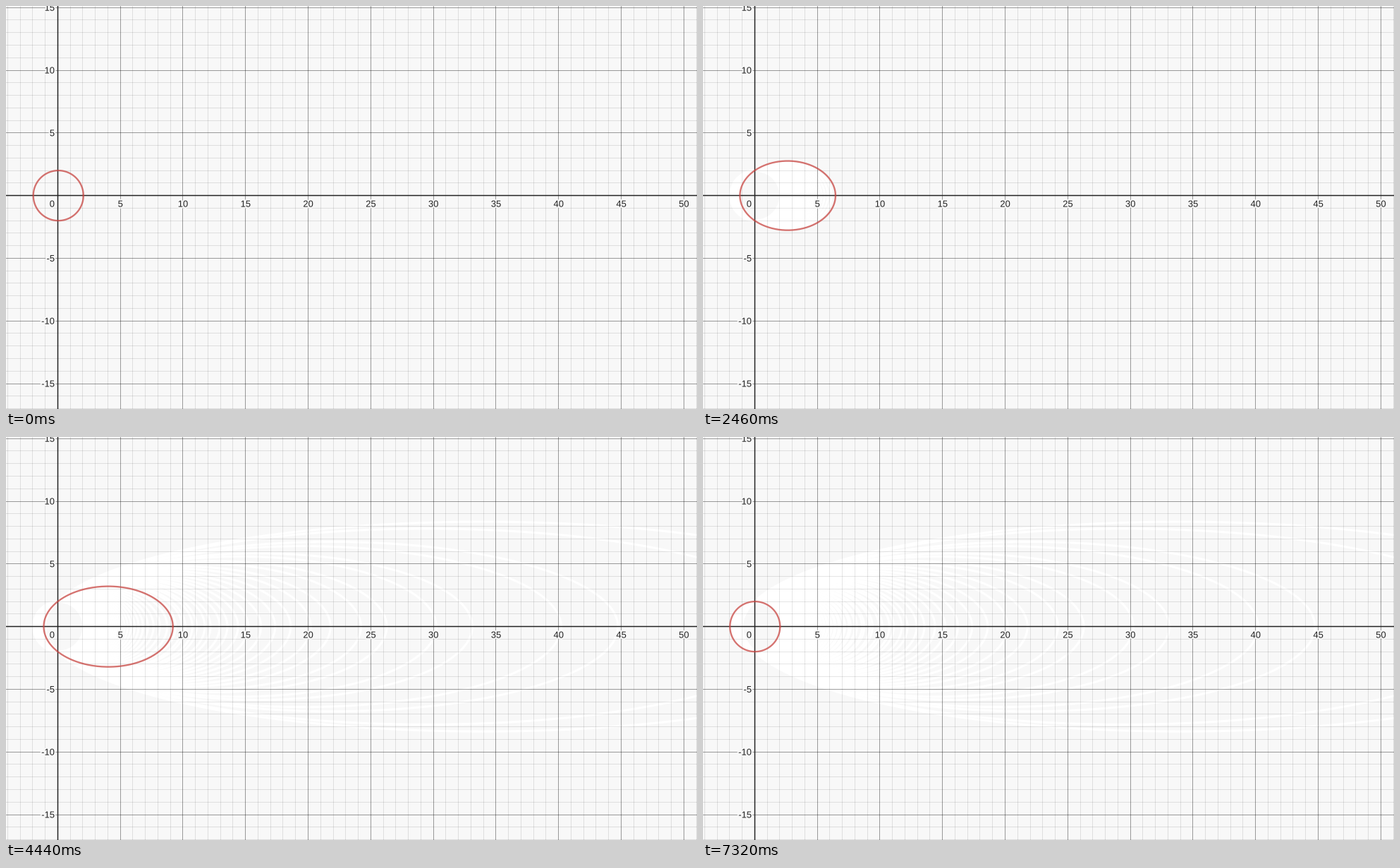
Animation, 980 px wide and 571 px high, one loop 7.38 s. Source, as a matplotlib script:

```python
import numpy as np
import matplotlib.pyplot as plt
from matplotlib.animation import FuncAnimation
from matplotlib.patheffects import withStroke

W, H, DPI = 980, 571, 100
PX = 72 / DPI                  # one pixel in points
OX, OY, UNIT = 73.4, 268.62, 17.76
FRAMES, STEP = 123, 60
BG, INK, RED = "#f8f8f8", "#222222", "#c74440"
WIDEST_TRAIL = 0.975

# Angles packed more tightly around the far vertex
u = np.linspace(0, 2 * np.pi, 361)
THETA = u - 0.8 * np.sin(u)


def eccentricity(i):
    """Steady rise from a circle to a near parabola, then back."""
    return np.interp(i, [0, 54, 60, 62, 74, 122],
                     [0.024, 0.901, 0.9995, 0.971, 0.7825, 0.01])


def conic(e):
    """Conic with its focus at the origin and semi-latus rectum 2."""
    r = 2 / (1 - e * np.cos(THETA))
    return OX + UNIT * r * np.cos(THETA), OY - UNIT * r * np.sin(THETA)


fig = plt.figure(figsize=(W / DPI, H / DPI), dpi=DPI, facecolor=BG)
ax = fig.add_axes([0, 0, 1, 1])
ax.set_xlim(0, W)
ax.set_ylim(H, 0)
ax.axis("off")


def pixel(v):
    return np.floor(v) + 0.5


def rule_lines(cols, rows, color, alpha, width, z):
    """Crisp grid lines at the given unit coordinates."""
    style = dict(colors=color, alpha=alpha, linewidth=width * PX, zorder=z,
                 snap=False)
    ax.vlines(pixel(OX - 0.1 + UNIT * cols), 0, H, **style)
    ax.hlines(pixel(OY - UNIT * rows), 0, W, **style)


cols, rows = np.arange(-4, 52), np.arange(-17, 16)
rule_lines(cols[cols % 5 != 0], rows[rows % 5 != 0], "black", 0.10, 1, 2)
rule_lines(cols[(cols % 5 == 0) & (cols != 0)],
           rows[(rows % 5 == 0) & (rows != 0)], "black", 0.38, 1, 2.1)
rule_lines(np.array([0]), np.array([0]), INK, 1, 1.5, 3)


def label(x, y, value, ha):
    ax.text(x, y, str(value), ha=ha, va="center_baseline", color=INK,
            fontname="Liberation Sans", fontsize=13 * PX, zorder=4,
            path_effects=[withStroke(linewidth=4 * PX, foreground=BG)])


for n in range(5, 51, 5):
    label(OX + UNIT * n, OY + 11.5, n, "center")
for n in range(-15, 16, 5):
    label(69, OY - UNIT * n if n else OY + 11.5, n, "right")

# Every past curve leaves a white trace, except the widest ones
trails = [ax.plot(*conic(e), color="white", lw=3.2 * PX, zorder=1)[0]
          if e < WIDEST_TRAIL else ax.plot([], [])[0]
          for e in map(eccentricity, range(FRAMES))]
curve, = ax.plot([], [], color=RED, alpha=0.75, lw=2.3 * PX, zorder=5)


def draw(i):
    for k, trail in enumerate(trails):
        trail.set_visible(k < i)
    curve.set_data(*conic(eccentricity(i)))
    return [curve, *trails]


anim = FuncAnimation(fig, draw, frames=FRAMES, interval=STEP,
                     repeat=True, repeat_delay=0, blit=False)
plt.show()
```
